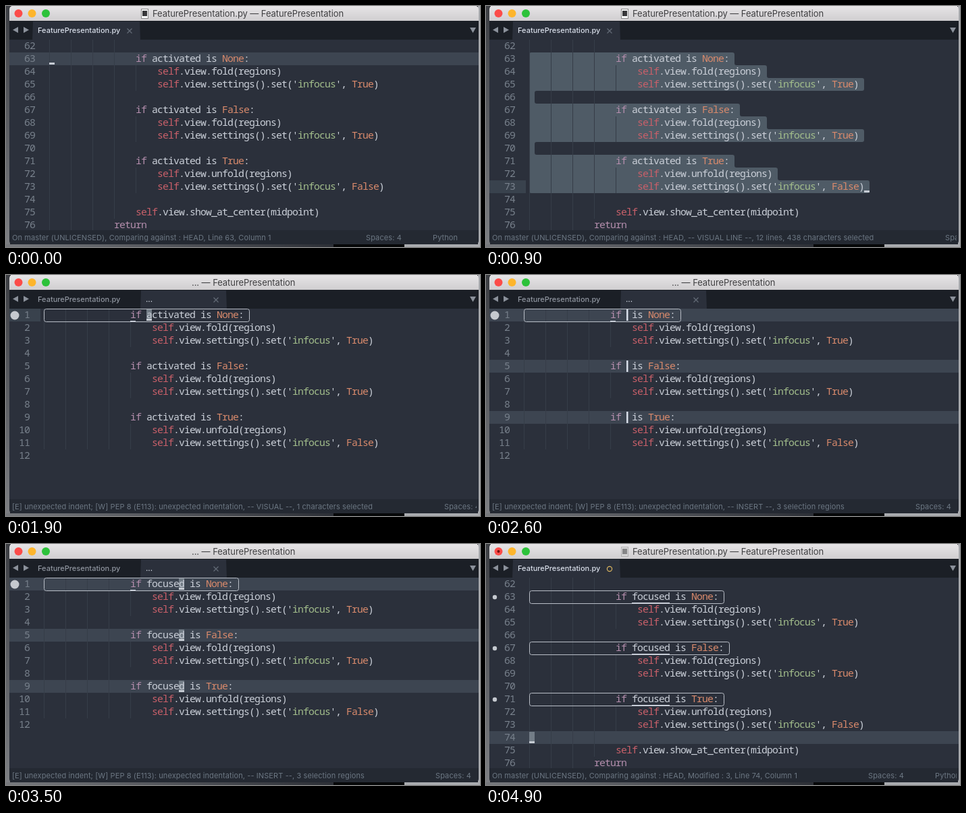
An HTML page with a canvas for the animation above (6000 ms loop, 702 by 358 pixels).

```html
<!DOCTYPE html>
<html lang="en">
<head>
<meta charset="utf-8">
<title>Editing in a second buffer</title>
<style>
  html, body { margin: 0; width: 100%; height: 100%; overflow: hidden; background: #202228; }
  canvas { display: block; width: 702px; height: 358px; }
</style>
</head>
<body>
<canvas id="stage" width="702" height="358"></canvas>
<script>
const ctx = document.getElementById('stage').getContext('2d');

const LOOP = 6000, CELL = 8, ROW = 19, TOP = 50, LEFT = 5, RIGHT = 700;
const MONO = '500 14.8px "Noto Sans Mono", "DejaVu Sans Mono", monospace';
const UI = 'Inter, Roboto, sans-serif';
const C = {
  bg: '#2b303b', bar: '#1b1f26', line: '#3d4551', select: '#4f5b66', block: '#737d87',
  text: '#cbd0d9', dim: '#6c7783', number: '#78818c', bright: '#d8dee9', guide: '#363d48',
  purple: '#b48ead', red: '#c9606a', orange: '#d98a6c', green: '#a3be8c'
};
const TOKENS = { if: C.purple, return: C.purple, self: C.red, infocus: C.green,
                 None: C.orange, True: C.orange, False: C.orange };
const HEAD = 'On master (UNLICENSED), Comparing against : HEAD, ';
const LINT = '[E] unexpected indent; [W] PEP 8 (E113): unexpected indentation, ';

const pad = (n, s) => ' '.repeat(n) + s;

function block(word) {
  const part = (value, call, flag) => [
    pad(16, `if ${word} is ${value}:`),
    pad(20, `self.view.${call}(regions)`),
    pad(20, `self.view.settings().set('infocus', ${flag})`)
  ];
  return [...part('None', 'fold', 'True'), '', ...part('False', 'fold', 'True'), '',
          ...part('True', 'unfold', 'False')];
}

const wholeFile = word => ['', ...block(word), '',
  pad(16, 'self.view.show_at_center(midpoint)'), pad(12, 'return')];

// Last entry whose start time has passed
const at = (t, steps) => steps.filter(s => t >= s[0]).pop()[1];

// --- What the editor holds at each time ---

function fileScene(t) {
  const s = { main: true, first: 62, x: 64, lines: wholeFile('activated'), rows: [1], lit: true,
              blocks: [], under: [], carets: [], marks: [], boxes: [], words: [] };
  if (t < 300) {
    s.under = [[1, 0]];
    s.status = HEAD + 'Line 63, Column 1';
  } else if (t < 1200) {
    const last = at(t, [[300, 1], [600, 4], [700, 8], [800, 12], [900, 11]]);
    const chars = s.lines.slice(1, last + 1).reduce((n, l) => n + l.length + 1, 0);
    s.rows = [last];
    s.lit = false;
    s.select = [1, last];
    s.under = [[last, s.lines[last].length]];
    s.status = HEAD + (t < 400 ? '-- VISUAL LINE --, Line 63, Column 1'
      : `-- VISUAL LINE --, ${last + 1} lines, ${chars} characters selected`);
  } else {
    s.dirty = true;
    s.lines = wholeFile('focused');
    s.rows = [12];
    s.blocks = s.under = [[12, 0]];
    s.status = HEAD + 'Modified : 3, Line 74, Column 1';
    if (t >= 4800) s.boxes = s.words = [1, 5, 9];
    if (t >= 4900) s.marks = [1, 5, 9];
  }
  return s;
}

function bufferScene(t) {
  const typed = at(t, [[0, 0], [2900, 1], [3000, 3], [3100, 4], [3200, 6], [3300, 7]]);
  const word = t < 2600 ? 'activated' : 'focused'.slice(0, typed);
  const s = { main: false, first: 1, x: 56, lines: [...block(word), ''], rows: [0], lit: true,
              blocks: [], under: [], carets: [], marks: [0], boxes: [0], words: [] };
  if (t < 1900) {
    const col = at(t, [[0, 0], [1500, 16], [1600, 19]]);
    s.blocks = s.under = [[0, col]];
    s.status = LINT + `Line 1, Column ${col + 1}`;
  } else if (t < 2600) {
    const size = t < 2000 ? 1 : 9;
    s.rows = at(t, [[0, [0]], [2200, [0, 4]], [2300, [0, 4, 8]]]);
    s.lit = false;
    s.blocks = s.rows.map(r => [r, 19, size]);
    s.under = s.rows.map(r => [r, 18 + size]);
    s.status = LINT + '-- VISUAL --, ' + (s.rows.length > 1
      ? `${s.rows.length} selection regions` : `${size} characters selected`);
  } else if (t < 4000) {
    s.rows = [0, 4, 8];
    if (t < 3500) s.carets = s.rows.map(r => [r, 19 + typed]);
    else s.blocks = s.under = s.rows.map(r => [r, 25]);
    s.status = LINT + '-- INSERT --, 3 selection regions';
  } else {
    s.blocks = s.under = [[0, 25]];
    s.status = LINT + 'Line 1, Column 26';
  }
  return s;
}

const scene = t => t >= 1200 && t < 4600 ? bufferScene(t) : fileScene(t);

// --- Drawing helpers ---

function rect(x, y, w, h, fill) {
  ctx.fillStyle = fill;
  ctx.fillRect(x, y, w, h);
}

function disc(x, y, r, fill) {
  ctx.fillStyle = fill;
  ctx.beginPath();
  ctx.arc(x, y, r, 0, 7);
  ctx.fill();
}

function poly(fill, ...pts) {
  ctx.fillStyle = fill;
  ctx.beginPath();
  pts.forEach(p => ctx.lineTo(...p));
  ctx.fill();
}

function fade(x, y, from, to) {
  const g = ctx.createLinearGradient(0, 0, x, y);
  g.addColorStop(0, from);
  g.addColorStop(1, to);
  return g;
}

function setFont(font, spacing) {
  ctx.font = font;
  ctx.letterSpacing = spacing + 'px';
}

function label(s, x, y, fill) {
  ctx.fillStyle = fill;
  ctx.fillText(s, x, y);
}

// --- Window parts ---

function desktop() {
  rect(0, 354, 485, 4, fade(485, 0, '#77797d', '#2c2f36'));
  rect(485, 354, 105, 4, '#060708');
  rect(590, 354, 112, 4, '#a9abaf');
  rect(0, 0, 6, 354, fade(0, 354, '#3c3e43', '#7d7f83'));
  rect(699, 0, 3, 354, '#a9abaf');
}

function titleBar(s) {
  rect(LEFT, 0, RIGHT - LEFT, 22, fade(0, 22, '#e6e4e6', '#d0ced0'));
  disc(18.5, 11, 6, '#fb4c49');
  disc(38.5, 11, 6, '#fdb52c');
  disc(59, 11, 6, '#2dc23a');
  if (s.dirty) disc(18.5, 11, 2, '#6e0f0c');
  setFont('13px ' + UI, -0.07);
  if (s.main) {
    ctx.globalAlpha = s.dirty ? 0.5 : 1;
    rect(200, 4, 11, 15, '#8b8b8b');
    rect(201, 5, 9, 13, '#fafafa');
    rect(202, 7, 7, 8, '#38383a');
    ctx.globalAlpha = 1;
    label('FeaturePresentation.py — FeaturePresentation', 217, 16, '#3f3f41');
  } else {
    label('... — FeaturePresentation', 275, 16, '#3f3f41');
  }
}

function tabBar(s) {
  rect(LEFT, 22, RIGHT - LEFT, 28, C.bar);
  const [a, b] = s.main ? [39, 199] : [199, 327];
  poly(C.bg, [a, 50], [a + 1, 23], [b - 1, 23], [b, 50]);
  poly('#8b919b', [10, 35.5], [18, 31], [18, 40]);
  poly('#8b919b', [34, 35.5], [26, 31], [26, 40]);
  poly('#8b919b', [687, 32], [696, 32], [691.5, 40]);
  setFont('500 11px ' + UI, 0);
  label('FeaturePresentation.py', 47, 40, s.main ? C.bright : '#8f959f');
  if (!s.main) label('...', 207, 40, C.bright);

  const x = b - 16, y = 37;
  ctx.lineWidth = 1.2;
  ctx.beginPath();
  if (s.dirty) {
    ctx.strokeStyle = '#dcb65f';
    ctx.arc(x, y, 3.6, 0, 7);
  } else {
    ctx.strokeStyle = '#636b76';
    ctx.moveTo(x - 3.5, y - 3.5);
    ctx.lineTo(x + 3.5, y + 3.5);
    ctx.moveTo(x + 3.5, y - 3.5);
    ctx.lineTo(x - 3.5, y + 3.5);
  }
  ctx.stroke();
}

const rowY = r => TOP + r * ROW;
const rowEnd = (s, r) => s.x + (s.lines[r].length + 1) * CELL;

function selection(s) {
  const [from, to] = s.select, pts = [];
  for (let r = from; r <= to; r++) {
    const x = rowEnd(s, r);
    pts.push([x, rowY(r)], [x, rowY(r + 1)]);
  }
  pts.push([s.x, rowY(to + 1)], [s.x, rowY(from)]);
  ctx.fillStyle = C.select;
  ctx.beginPath();
  ctx.moveTo(s.x + 4, rowY(from));
  pts.forEach((p, i) => ctx.arcTo(...p, ...(pts[i + 1] || [s.x + 4, rowY(from)]), 3));
  ctx.fill();
}

function guides(s, r) {
  const line = s.lines[r];
  if (!line && r === s.lines.length - 1) return;
  const indent = line ? line.search(/\S/) : 16;
  for (let c = 0; c < indent; c += 4) rect(s.x + c * CELL, rowY(r), 1, ROW, C.guide);
}

function codeLine(s, r) {
  const y = rowY(r) + 14, num = String(s.first + r);
  label(num, s.x - 21 - num.length * CELL, y, C.number);
  let col = 0;
  for (const part of s.lines[r].split(/\b(if|return|self|infocus|None|True|False)\b/)) {
    if (part.trim()) label(part, s.x + col * CELL, y, TOKENS[part] || C.text);
    col += part.length;
  }
}

function editor(s) {
  rect(LEFT, TOP, RIGHT - LEFT, 284, C.bg);
  const lineWidth = s.lit ? RIGHT - LEFT : s.x - 5 - LEFT;
  s.rows.forEach(r => rect(LEFT, rowY(r), lineWidth, ROW, s.lit ? C.line : '#39424d'));
  if (s.select) selection(s);
  s.lines.forEach((_, r) => guides(s, r));
  for (const [r, c, n = 1] of s.blocks)
    rect(s.x + c * CELL, rowY(r) + 1, n * CELL, 17, C.block);

  setFont(MONO, 0);
  ctx.letterSpacing = CELL - ctx.measureText('0').width + 'px';
  s.lines.forEach((_, r) => codeLine(s, r));

  s.under.forEach(([r, c]) => rect(s.x + c * CELL, rowY(r) + 15, CELL, 3, '#c6cbd3'));
  s.carets.forEach(([r, c]) => rect(s.x + c * CELL, rowY(r) + 1, 2.5, 17, C.bright));
  ctx.strokeStyle = '#b9bec7';
  ctx.lineWidth = 1;
  for (const r of s.boxes) {
    ctx.beginPath();
    ctx.roundRect(s.x + 0.5, rowY(r) + 0.5, rowEnd(s, r) - s.x, ROW, 3);
    ctx.stroke();
  }
  s.words.forEach(r => rect(s.x + 19 * CELL, rowY(r) + 18, 7 * CELL, 1, C.bright));
  if (!s.main) rect(s.x + 16 * CELL, rowY(0) + 18, CELL, 1, C.bright);
  s.marks.forEach(r => disc(13, rowY(r) + 10, s.main ? 3.2 : 6.5, '#c5c9cf'));
}

function statusBar(s) {
  rect(LEFT, 333, RIGHT - LEFT, 21, '#242932');
  ctx.save();
  ctx.beginPath();
  ctx.rect(LEFT, 333, 692, 21);
  ctx.clip();
  setFont('11px ' + UI, 0.1);
  label(s.status, 9, 348, C.dim);
  const x = Math.max(533, Math.round(9 + ctx.measureText(s.status).width + 105.5));
  label('Spaces: 4', x, 348, C.dim);
  label('Python', x + 99, 348, C.dim);
  ctx.restore();
}

function draw(t) {
  const s = scene(t);
  desktop();
  ctx.save();
  ctx.beginPath();
  ctx.roundRect(LEFT, 0, RIGHT - LEFT, 354, 5);
  ctx.clip();
  titleBar(s);
  tabBar(s);
  editor(s);
  statusBar(s);
  ctx.restore();
}

const start = performance.now();
function tick() {
  draw((performance.now() - start) % LOOP);
  requestAnimationFrame(tick);
}
tick();
</script>
</body>
</html>
```
